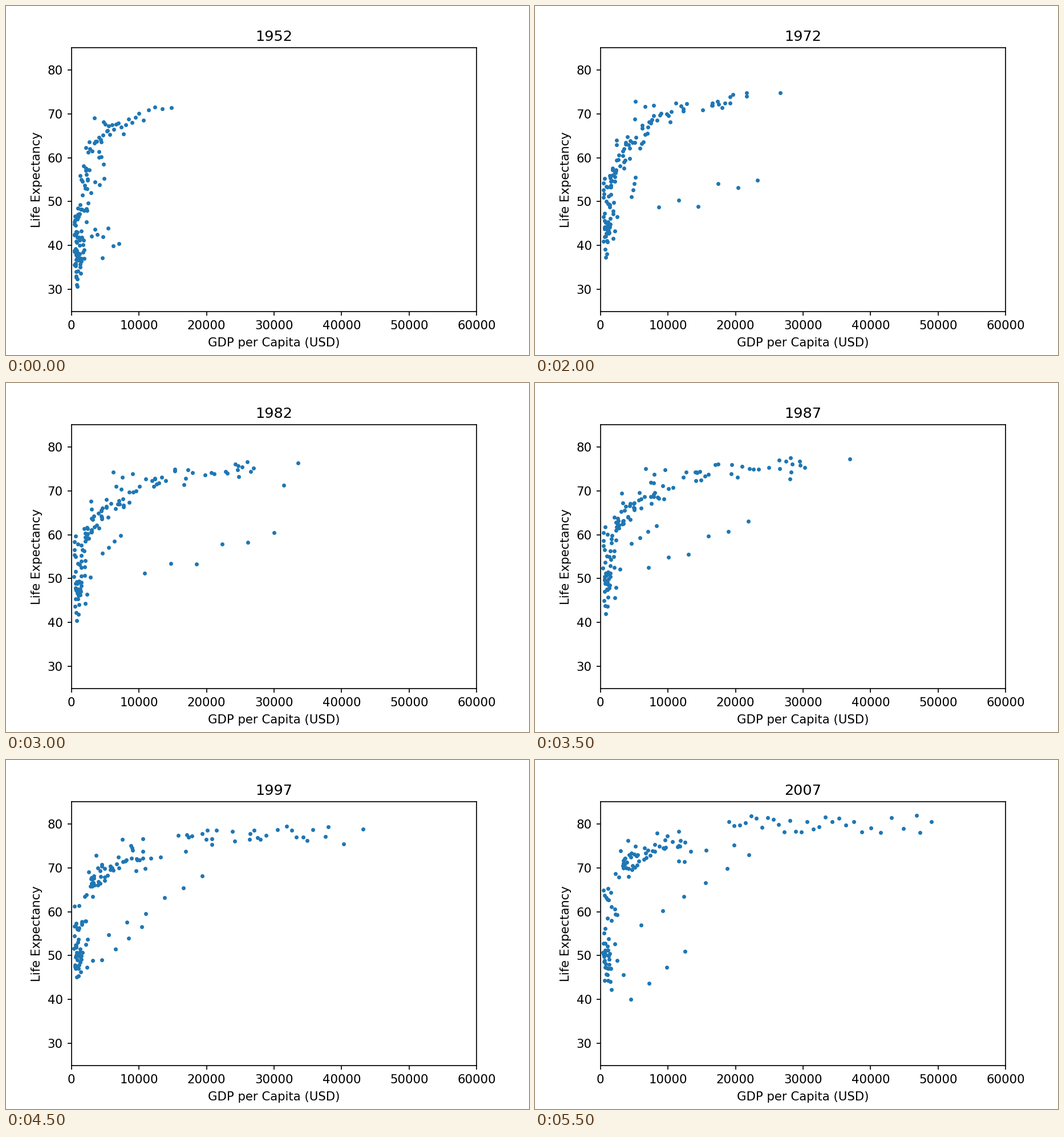
Write a matplotlib script that moves like this. It is 917x611 px and loops after 6000 ms.

```python
import matplotlib.pyplot as plt
import numpy as np
from matplotlib.animation import FuncAnimation

WIDTH, HEIGHT, DPI = 917, 611, 152.75
START, PEAK, END, STEP = 1952, 1987, 2007, 5
YEARS = range(START, END + 1, STEP)
RICH, OIL, SLUMP, MID, LOW = 29, 6, 4, 55, 47
rng = np.random.default_rng(12)


def noise(count, spread):
    return spread * rng.standard_normal(count).clip(-2, 2)


def skewed(count, low, mode, high):
    return rng.triangular(low, mode, high, count)


def mix(a, b, t):
    return a + (b - a) * t


def grow(a, b, t, bulge):
    """Geometric growth that runs ahead of a steady rate midway."""
    return a * (b / a) ** (t + bulge * np.sin(np.pi * t))


def rise_and_turn(start, peak, end, year):
    if year < PEAK:
        return mix(start, peak, (year - START) / (PEAK - START))
    return mix(peak, end, (year - PEAK) / (END - PEAK))


# Incomes are in thousands. Suffixes 0, 1 and 2 mark start, turn and end.
rank = np.linspace(0, 1, RICH)
late_rank = np.argsort(np.argsort(rank + noise(RICH, 0.35))) / (RICH - 1)
rich_x0 = 1.8 + 9 * rank + 4 * rank ** 8
rich_x2 = 19 + 23 * late_rank + 7 * late_rank ** 6
rich_y0 = 60 + 10 * rank ** 0.6 + noise(RICH, 1.2)
rich_y2 = skewed(RICH, 77, 80, 82.6)

oil = np.linspace(0, 1, OIL)
oil_y0 = 41 + noise(OIL, 2.5)

slump = np.linspace(0, 1, SLUMP)

rank = np.linspace(0, 1, MID)
mid_x0 = 0.6 * 9 ** rank * np.exp(noise(MID, 0.3))
mid_x2 = 3 * 4.5 ** rank * np.exp(noise(MID, 0.25))
mid_y0 = 39 + 25 * rank + noise(MID, 3)
mid_y2 = 70 + 5.5 * rank + noise(MID, 1.6)

low_x0 = np.exp(skewed(LOW, *np.log([0.3, 0.8, 2.6])))
low_x2 = low_x0 * np.exp(skewed(LOW, -0.4, 0.2, 0.7))
low_y0 = skewed(LOW, 29, 39, 49)
low_y1 = low_y0 + skewed(LOW, 8, 13, 18)
low_y2 = skewed(LOW, 41, 50, 68)


def rich(year, t):
    return grow(rich_x0, rich_x2, t, 0.14), mix(rich_y0, rich_y2, t)


def middle(year, t):
    return grow(mid_x0, mid_x2, t, 0.12), mix(mid_y0, mid_y2, t ** 0.85)


def low(year, t):
    return (grow(low_x0, low_x2, t, 0.1),
            rise_and_turn(low_y0, low_y1, low_y2, year))


def oil_boom(year, t):
    boom = (8 + 11 * oil) * np.exp(-((year - 1978) / 8) ** 2)
    x = mix(3 + 4 * oil, 6 + 16 * oil, t) + boom
    return x, mix(oil_y0, 57 + 16 * oil, t ** 0.8)


def late_slump(year, t):
    x = mix(1 + 3.7 * slump, 12.5 - 8 * slump, t)
    y = rise_and_turn(47 - 5 * slump, 62 - 4 * slump, 51 - 11 * slump, year)
    return x, y


def runaway(year, t):
    """One very high income that drops into view in the seventies."""
    turns = 1972, 1977, 1982, 1987, 1997, 2007
    x = np.interp(year, turns, (109, 59.3, 31.4, 28.1, 40.3, 47.3))
    return [x], [mix(60.5, 78, t ** 0.8)]


def positions(year):
    t = (year - START) / (END - START)
    groups = rich, middle, low, oil_boom, late_slump, runaway
    x, y = np.hstack([group(year, t) for group in groups])
    return np.column_stack((1000 * x, y))


plt.rcParams.update({"font.family": "DejaVu Sans", "font.size": 10})
fig, ax = plt.subplots(figsize=((WIDTH + 1e-6) / DPI, HEIGHT / DPI), dpi=DPI)
fig.subplots_adjust(left=0.125, right=0.9, bottom=0.125, top=0.88)
ax.set(xlim=(0, 60000), ylim=(25, 85))
ax.set_xlabel("GDP per Capita (USD)", labelpad=4.5)
ax.set_ylabel("Life Expectancy")
ax.tick_params(axis="x", pad=3.9)
title = ax.set_title(str(START), fontsize=12)
dots = ax.scatter(*positions(START).T, s=3.3 ** 2, color="#1f77b4", linewidths=0)


def update(frame):
    year = YEARS[frame]
    dots.set_offsets(positions(year))
    title.set_text(str(year))
    return dots, title


anim = FuncAnimation(fig, update, frames=len(YEARS), interval=500,
                     repeat=True, repeat_delay=0, blit=False)
plt.show()
```
